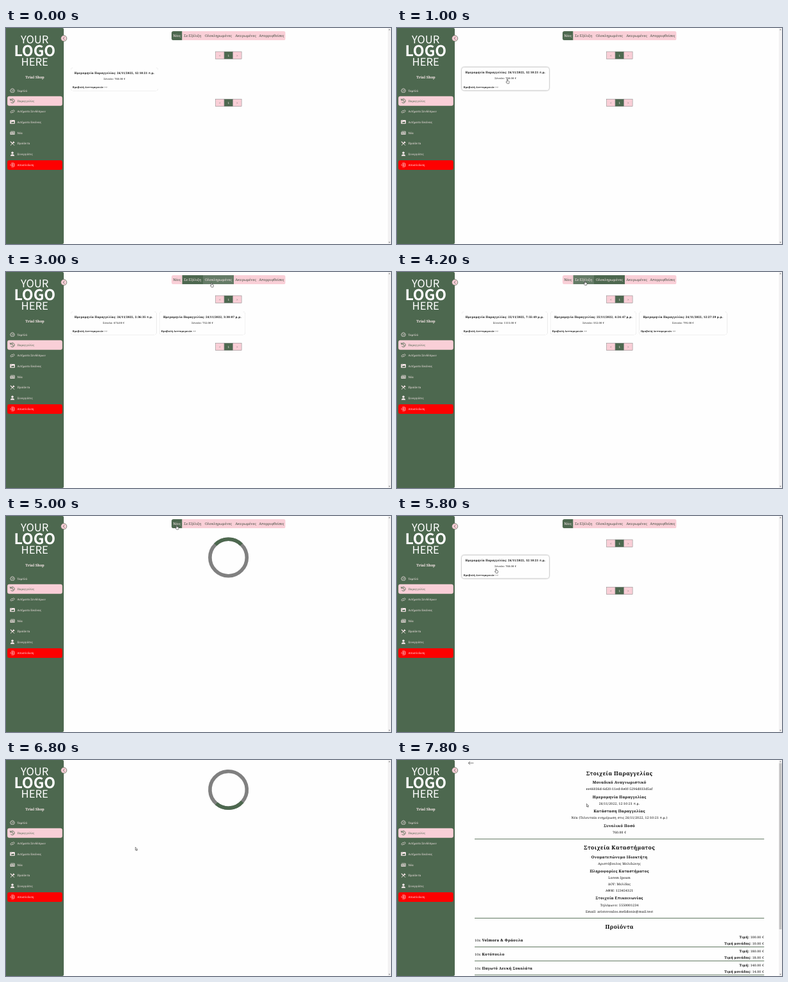
An HTML page that plays this animation: 600x338 px, repeating every 8000 ms.

```html
<!DOCTYPE html>
<html lang="el">
<head>
<meta charset="utf-8">
<title>Orders</title>
<style>
  html, body { margin: 0; width: 100%; height: 100%; overflow: hidden; background: #fefefe; }
  svg { display: block; width: 600px; height: 338px; }
  text { font-family: "Noto Serif", "DejaVu Serif", serif; text-rendering: geometricPrecision; white-space: pre; }
  .logo { font-family: "Noto Sans CJK JP", "Noto Sans CJK SC", "Open Sans", sans-serif; }
  .spaced { letter-spacing: .05em; }
  .card { filter: drop-shadow(0 .9px .6px rgba(0, 0, 0, .3)); }
  .card.over { filter: drop-shadow(0 .9px 1.2px rgba(0, 0, 0, .5)); }
</style>
</head>
<body>
<svg viewBox="0 0 600 338">
  <g id="side"></g>
  <g id="page"></g>
  <g id="toggle"></g>
  <g id="pointer"></g>
</svg>
<script>
const GREEN = '#4d684f', HOVER = '#647b66', PINK = '#f9cfd7', INK = '#000', PALE = '#fdeaed';
const LOOP = 8000, STEP = 200, MID = 346.6;
const byId = id => document.getElementById(id);
const esc = s => s.replace(/&/g, '&amp;').replace(/</g, '&lt;').replace(/>/g, '&gt;');

function text(x, y, size, str, { bold, anchor = 'start', fill = INK, cls = '' } = {}) {
  return `<text x="${x}" y="${y}" font-size="${size}" font-weight="${bold ? 700 : 400}" text-anchor="${anchor}" fill="${fill}" class="${cls}">${esc(str)}</text>`;
}
const rect = (x, y, w, h, fill, more = '') =>
  `<rect x="${x}" y="${y}" width="${w}" height="${h}" fill="${fill}" ${more}/>`;
const line = (d, color, width = .7) =>
  `<path d="${d}" fill="none" stroke="${color}" stroke-width="${width}" stroke-linecap="round" stroke-linejoin="round"/>`;

// Sidebar: icons are drawn around their own centre
const ICONS = {
  gauge: c => line('M-2.4 2.4A3.3 3.3 0 1 1 2.4 2.4ZM0 .9L1.2 -1.2M-1.8 .4h.1M1.9 .4h.1M-.9 -1.5h.1', c),
  history: c => line('M-2.9 -1.6A3.2 3.2 0 1 1 -2.4 2.1M-3.3 -3.2V-1.2H-1.3M0 -1.8V.2L1.4 1.2', c, .9),
  link: c => line('M-.6 1.4L-1.5 2.3A1.5 1.5 0 0 1 -3 .3L-1.2 -1.3A1.5 1.5 0 0 1 .7 -.9M.6 -1.4L1.5 -2.3A1.5 1.5 0 0 1 3 -.3L1.2 1.3A1.5 1.5 0 0 1 -.7 .9', c, .65),
  image: c => rect(-3.8, -3.1, 7.6, 6.2, c, 'rx=".8"') +
    `<path d="M-2.8 2L-1.2 0L-.4 .8L1.2 -1.2L3 2Z" fill="${GREEN}"/><circle cx="-1.9" cy="-1.4" r=".7" fill="${GREEN}"/>`,
  news: c => line('M-2.3 -2.3H3.3V2.3H-3.2V-1.2H-2.3V2M.9 -.9H2.3M.9 .2H2.3M-1.2 1.2H2.3', c, .7) + rect(-1.4, -1.3, 1.7, 1.7, c),
  food: c => line('M-2.6 -2.6L2.7 2.7M2.7 -2.5L-2.7 2.7', c, .9) + line('M-2.7 -2.5L-.6 -.4M1.5 -2.7L.9 -.8L2.9 -1.4', c, 1.1),
  user: c => `<circle cy="-1.7" r="1.7" fill="${c}"/><path d="M-3.1 3.2C-3.1 -.4 3.1 -.4 3.1 3.2Z" fill="${c}"/>`,
  exit: c => line('M-1.2 -2.8H1.6A1.2 1.2 0 0 1 2.8 -1.6V1.6A1.2 1.2 0 0 1 1.6 2.8H-1.2M-3.2 0H.9M-.5 -1.5L1 0L-.5 1.5', c, .8)
};
const MENU = [
  ['gauge', 98, 'Ταμπλό'], ['history', 114.2, 'Παραγγελίες'], ['link', 130.7, 'Αιτήματα Συνδέσμων'],
  ['image', 147, 'Αιτήματα Εικόνας'], ['news', 164.2, 'Νέα'], ['food', 180.7, 'Προϊόντα'],
  ['user', 197, 'Συνεργάτες'], ['exit', 214.3, 'Αποσύνδεση']
];

function sidebar() {
  const logo = (y, size, str, bold) => text(44.7, y, size, str, { bold, anchor: 'middle', fill: '#fff', cls: 'logo' });
  let out = `<path d="M0 0H88A2 2 0 0 1 90 2V336A2 2 0 0 1 88 338H0Z" fill="${GREEN}"/>`;
  out += logo(24.1, 16.6, 'YOUR') + logo(43.7, 23.1, 'LOGO', true) + logo(59.2, 16.6, 'HERE');
  out += text(45, 79.3, 5.6, 'Trial Shop', { bold: true, anchor: 'middle', fill: PALE });
  out += rect(2.1, 106.7, 85.7, 15.1, PINK, 'rx="3"') + rect(2.1, 206.9, 85.7, 15.1, '#fe0000', 'rx="3"');
  for (const [icon, y, label] of MENU) {
    const color = icon === 'history' ? GREEN : PALE;
    out += `<g transform="translate(10 ${y})">${ICONS[icon](color)}</g>` + text(17.4, y + 1.6, 4.4, label, { fill: color });
  }
  return out;
}

function scrollbar(thumb) {
  return rect(595, 0, 5, 338, '#f3f2f3') + (thumb ? rect(595.6, 5, 3.8, 260, '#c1c1c1') : '') +
    '<path d="M596.2 3.2L597.5 1.6L598.8 3.2ZM596.2 334.8L597.5 336.4L598.8 334.8Z" fill="#777"/>';
}

// Orders list
const TABS = [
  [258, 'Νέες'], [274.6, 'Σε Εξέλιξη'], [307, 'Ολοκληρωμένες'], [355, 'Ακυρωμένες'], [392, 'Απορριφθείσες'], [435.6]
];
const ORDERS = [
  [[101, 136, '26/11/2022, 12:10:21 π.μ.', '760.00']],
  [[101, 133.6, '26/11/2022, 2:36:35 π.μ.', '674.00'], [239.2, 133.6, '24/11/2022, 3:30:07 μ.μ.', '732.00']],
  [[101, 133.6, '25/11/2022, 7:55:49 μ.μ.', '1115.00'], [239.2, 133.6, '25/11/2022, 4:24:47 μ.μ.', '552.00'],
   [377.4, 137, '24/11/2022, 12:27:39 μ.μ.', '795.00']]
];

function tabs(active, cur) {
  let out = '<clipPath id="bar"><rect x="258" y="5" width="177.6" height="14.2" rx="3"/></clipPath><g clip-path="url(#bar)">';
  let labels = '';
  for (let i = 0; i < 5; i++) {
    const x = TABS[i][0], w = TABS[i + 1][0] - x;
    const over = cur && cur[3] === 'hand' && cur[1] >= x && cur[1] < x + w && cur[2] < 19;
    const fill = i === active ? GREEN : over ? HOVER : PINK;
    out += rect(x, 5, w, 14.2, fill);
    labels += text(x + w / 2, 14.3, 5.5, TABS[i][1], { anchor: 'middle', fill: fill === PINK ? '#3d4a3e' : PALE });
  }
  return out + '</g>' + labels;
}

function pager(y) {
  let out = '';
  ['<', '1', '>'].forEach((s, i) => {
    const mid = i === 1, x = 326.6 + i * 13.5;
    out += rect(x, y, 13.5, 11.5, mid ? GREEN : PINK, 'stroke="#7c7c7c" stroke-width=".5"') +
      text(x + 6.75, y + 7.5, 4.6, s, { anchor: 'middle', fill: mid ? PALE : '#5b6b5c' });
  });
  return out;
}

function card([x, w, date, sum], cur) {
  const over = cur && cur[1] > x && cur[1] < x + w && cur[2] > 62 && cur[2] < 98;
  const cx = x + w / 2, mid = { anchor: 'middle', cls: 'spaced' };
  return `<g transform="translate(0 ${over ? -.6 : 0})">` +
    rect(x, 62, w, 36.2, '#fefefe', `rx="4" class="card ${over ? 'over' : ''}"`) +
    text(cx, 71.6, 4.5, 'Ημερομηνία Παραγγελίας: ' + date, { ...mid, bold: true }) +
    text(cx, 80.5, 3.9, `Σύνολο: ${sum} €`, mid) +
    text(x + 2.5, 94.4, 3.75, 'Προβολή Λεπτομερειών >>', { bold: true, cls: 'spaced' }) + '</g>';
}

function list(tab, cur) {
  return tabs(tab, cur) + pager(37) + pager(111.2) + ORDERS[tab].map(o => card(o, cur)).join('');
}

function spinner(cy, elapsed) {
  const r = 28.7, k = r * Math.SQRT1_2, deg = elapsed * 176 / 600;
  return `<g transform="translate(${MID} ${cy}) rotate(${deg})" fill="none" stroke-width="5.6">` +
    `<circle r="${r}" stroke="#808080"/><path d="M${-k} ${-k}A${r} ${r} 0 0 1 ${k} ${-k}" stroke="${GREEN}"/></g>`;
}

// Order details: kind (t title, h heading, p plain), baseline, text
const DETAILS = [
  ['t', 24, 'Στοιχεία Παραγγελίας'],
  ['h', 37, 'Μοναδικό Αναγνωριστικό'], ['p', 47, 'ee46036d-6d20-11ed-8e0f-5296d033d5af'],
  ['h', 59.6, 'Ημερομηνία Παραγγελίας'], ['p', 69.9, '26/11/2022, 12:10:21 π.μ.'],
  ['h', 82.1, 'Κατάσταση Παραγγελίας'], ['p', 92.1, 'Νέα (Τελευταία ενημέρωση στις 26/11/2022, 12:10:21 π.μ.)'],
  ['h', 104.6, 'Συνολικό Ποσό'], ['p', 114.8, '760.00 €'],
  ['t', 140.2, 'Στοιχεία Καταστήματος'],
  ['h', 153.6, 'Ονοματεπώνυμο Ιδιοκτήτη'], ['p', 163.7, 'Αριστόβουλος Μελιδώνης'],
  ['h', 176.1, 'Πληροφορίες Καταστήματος'], ['p', 186.3, 'Lorem Ipsum'],
  ['p', 196.3, 'ΔΟΥ: Μελίδας'], ['p', 206.3, 'ΑΦΜ: 123454321'],
  ['h', 218.4, 'Στοιχεία Επικοινωνίας'], ['p', 228.7, 'Τηλέφωνο: 5550001234'],
  ['p', 238.9, 'Email: aristovoulos.melidonis@mail.test'],
  ['t', 264.3, 'Προϊόντα']
];
const SIZES = { t: 8.5, h: 5.95, p: 5 };
const ITEMS = [
  ['Velmora & Φράουλα', '100.00', '10.00'], ['Κοτόπουλο', '180.00', '18.00'], ['Παγωτό Λευκή Σοκολάτα', '140.00', '14.00']
];

function details() {
  const rule = y => line(`M121.4 ${y}H571.8`, GREEN, .9);
  const price = (y, label, value) =>
    `<text x="572" y="${y}" font-size="5" text-anchor="end" fill="${INK}" class="spaced">` +
    `<tspan font-size="5.4" font-weight="700">${label}:</tspan> ${value} €</text>`;
  let out = line('M119 4.8H111.4M113.8 2.5L111.4 4.8L113.8 7.1', '#444', .7);
  for (const [kind, y, str] of DETAILS)
    out += text(MID, y, SIZES[kind], str, { bold: kind !== 'p', anchor: 'middle', cls: 'spaced' });
  out += rule(123.7) + rule(247.5);
  ITEMS.forEach(([name, total, unit], i) => {
    const y = 284 + i * 21.9;
    out += text(121.2, y, 5, '10x', { cls: 'spaced' }) + text(132.5, y, 5.8, name, { bold: true, cls: 'spaced' }) +
      price(y - 5, 'Τιμή', total) + price(y + 5, 'Τιμή μονάδας', unit) + rule(y + 8.5);
  });
  return out;
}

// Timeline: start time, view, tab
const VIEWS = [
  [0, 'list', 0], [2400, 'wait', 1], [2600, 'list', 1], [3800, 'wait', 2], [4000, 'list', 2],
  [5000, 'wait', 0], [5200, 'list', 0], [6200, 'load'], [7000, 'details']
];
// Pointer: time, tip x, tip y, shape
const MOVES = [
  [800, 160, 88, 'hand'], [1000, 172, 80, 'hand'], [1200, 196, 66, 'hand'], [1400, 226, 48, 'arrow'],
  [1600, 255, 32, 'arrow'], [1800, 274, 20, 'arrow'], [2000, 285.8, 18, 'hand'], [2600, 291, 17.6, 'hand'],
  [2800, 308, 17.2, 'hand'], [3000, 320.4, 16.8, 'hand'], [4000, 310, 15.5, 'hand'], [4200, 293, 13.6, 'hand'],
  [4400, 282, 13.6, 'hand'], [4600, 272, 14, 'hand'], [4800, 266, 14.2, 'hand'], [5400, 235, 32, 'arrow'],
  [5800, 154.4, 82.4, 'hand'], [6000, 154.6, 84, 'hand'], [6200, 156, 89, 'arrow'], [6400, 168, 104, 'arrow'],
  [6600, 188, 124, 'arrow'], [6800, 201.7, 136.5, 'arrow'], [7000, 215, 132, 'arrow'], [7200, 240, 112, 'arrow'],
  [7400, 268, 88, 'arrow'], [7600, 288, 74, 'arrow'], [7800, 295.5, 68.4, 'arrow']
];
const SHAPES = {
  arrow: 'M0 0V4.7L1.1 3.8L1.9 5.5L2.7 5.1L1.9 3.5H3.3Z',
  hand: 'M-.6 .5Q0 -.4 .6 .5V2.7L2.7 3.3Q3.2 3.6 3.1 4.3L2.5 6.9H-.4L-2.1 4.4Q-2 3.5 -.6 4.4Z'
};
const last = (rows, t) => rows.filter(r => r[0] <= t).pop();

function render(t) {
  const [start, view, tab] = last(VIEWS, t), cur = last(MOVES, t);
  const body = {
    list: () => list(tab, cur),
    wait: () => tabs(tab, cur) + spinner(65, t - start),
    load: () => spinner(46.5, t - start),
    details
  }[view]();
  byId('page').innerHTML = body + scrollbar(view === 'details');
  byId('pointer').innerHTML = cur
    ? `<path transform="translate(${cur[1]} ${cur[2]})" d="${SHAPES[cur[3]]}" fill="#fff" stroke="#222" stroke-width=".55" stroke-linejoin="round"/>`
    : '';
}

byId('side').innerHTML = sidebar();
byId('toggle').innerHTML = `<circle cx="90.1" cy="16.2" r="4.6" fill="${PINK}" stroke="${GREEN}" stroke-width=".7"/>` +
  line('M91.1 14.2L89.1 16.2L91.1 18.2', '#3d4a3e', .7);

const origin = performance.now();
let shown = -1;
function tick() {
  const t = Math.floor(((performance.now() - origin) % LOOP) / STEP) * STEP;
  if (t !== shown) render(shown = t);
  requestAnimationFrame(tick);
}
tick();
</script>
</body>
</html>
```
